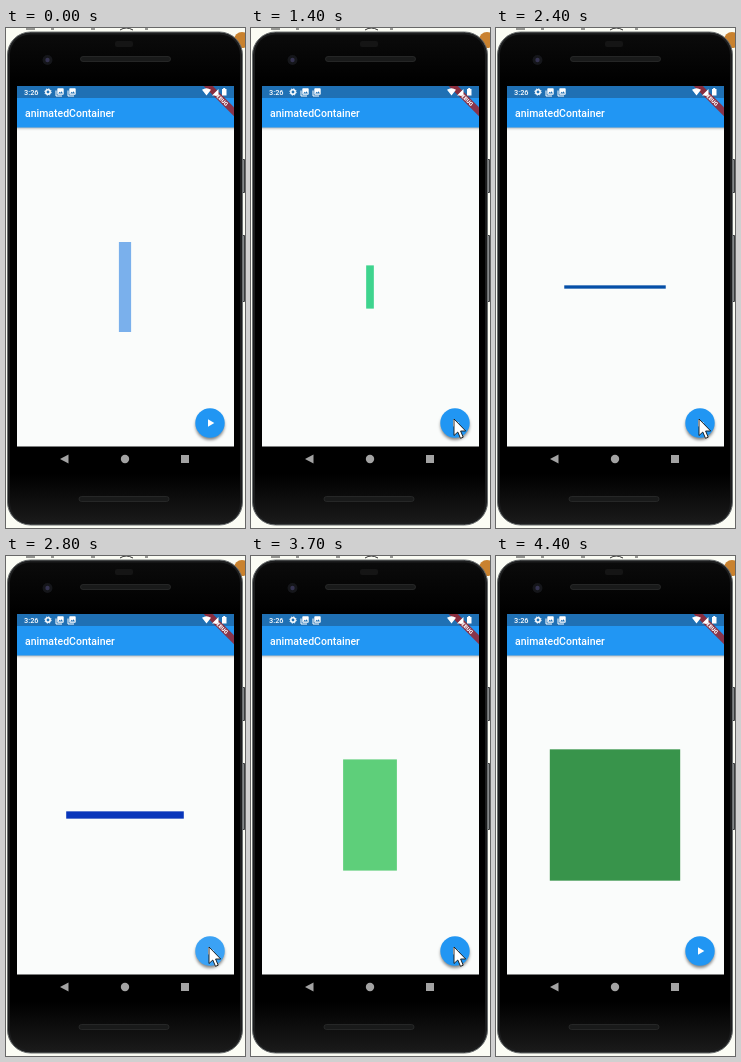
Recreate the animation shown at these times as an HTML page. Size 239 px wide and 500 px high, loop 4.7 s.

```html
<!DOCTYPE html>
<html lang="en">
<head>
<meta charset="utf-8">
<title>animatedContainer</title>
<style>
  html, body { margin: 0; width: 100%; height: 100%; overflow: hidden; background: #fbfcf4; }
  svg { display: block; width: 239px; height: 500px; }
  text { font-family: Roboto, "Open Sans", sans-serif; font-weight: 500; fill: #fff; }
</style>
</head>
<body>
<svg viewBox="0 0 239 500">
  <defs>
    <clipPath id="screen"><rect x="11" y="58" width="217" height="360.500"/></clipPath>
    <filter id="soft" x="-50%" y="-50%" width="200%" height="200%"><feGaussianBlur stdDeviation="1.500"/></filter>
    <linearGradient id="body" x2="0" y2="1">
      <stop offset="0" stop-color="#0b0b0b"/>
      <stop offset=".1" stop-color="#000"/>
      <stop offset=".9" stop-color="#000"/>
      <stop offset="1" stop-color="#1a1a1a"/>
    </linearGradient>
    <g id="photo">
      <path d="M.5 2.500V8H6.500" fill="none" stroke="#fff"/>
      <rect x="1.800" y=".3" width="6.400" height="6.400" rx=".8" fill="#fff"/>
      <path d="M2.800 5.500l1.300-1.800 1 1 1-1.400 1.300 2.200z" fill="#1f70b4"/>
    </g>
  </defs>

  <!-- desktop behind the phone -->
  <path d="M20 1h9M45 1h3M85 1h4M139 1h3M114 2q6-4 13 0" fill="none" stroke="#333"/>
  <circle cx="236" cy="12" r="8" fill="#c9822f"/>
  <path d="M235.500 131.500h3v33h-3zM235.500 207.500h3v66h-3z" fill="#85888a" stroke="#3c3f40"/>

  <!-- phone -->
  <rect x="1.500" y="4" width="235" height="493" rx="23" fill="#1c1d1e" stroke="#6a6e6f"/>
  <rect x="4" y="6.500" width="230" height="488" rx="20" fill="url(#body)"/>
  <rect x="109" y="13" width="18" height="6" rx="2" fill="#151515"/>
  <g fill="#191a1a" stroke="#2b2c2c" stroke-width=".8">
    <rect x="74.500" y="28.500" width="90" height="5" rx="2.500"/>
    <rect x="73" y="468.500" width="90" height="5" rx="2.500"/>
  </g>
  <circle cx="41.500" cy="32" r="5" fill="#15161a"/>
  <circle cx="41.500" cy="32" r="2.200" fill="#34324f"/>
  <g fill="#a3a3a3">
    <path d="M54 431l8.500-4.500v9z"/>
    <circle cx="119" cy="431" r="4.200"/>
    <rect x="175" y="427" width="8" height="8"/>
  </g>

  <!-- app -->
  <g clip-path="url(#screen)">
    <rect x="11" y="58" width="217" height="361" fill="#fafcfb"/>
    <rect x="5" y="71" width="229" height="29" fill="#0006" filter="url(#soft)"/>
    <rect x="11" y="70" width="217" height="29.500" fill="#2196f3"/>
    <rect x="11" y="58" width="217" height="12" fill="#1f70b4"/>
    <text x="19" y="89" font-size="10.5">animatedContainer</text>
    <rect id="box"/>
    <circle cx="204" cy="397.500" r="14.500" fill="#0007" filter="url(#soft)"/>
    <circle cx="204" cy="395" r="14.700" fill="#2196f3"/>
    <circle id="ripple" cx="204" cy="395" r="14.700" fill="#fff"/>
    <path d="M202 391.200v7.600l6.300-3.800z" fill="#fff"/>
    <g transform="translate(228 58) rotate(45)">
      <rect x="-24" y="15" width="48" height="6.400" fill="#a01f25" fill-opacity=".82"/>
      <text y="20.200" font-size="5.4" text-anchor="middle" style="font-weight:900">DEBUG</text>
    </g>
    <text x="18" y="67" font-size="7.4">3:26</text>
    <circle cx="42" cy="64" r="2.200" fill="none" stroke="#fff" stroke-width="1.500"/>
    <circle cx="42" cy="64" r="3.200" fill="none" stroke="#fff" stroke-dasharray="1.250"/>
    <use href="#photo" x="49.500" y="60"/>
    <use href="#photo" x="61.500" y="60"/>
    <path d="M196 61.800q4.500-3 9 0l-4.500 5.700zM206 67.500h6.500v-6.500zM216 61h1.200v-1h2v1h1.300v6.500h-4.500z" fill="#fff"/>
  </g>

  <path id="cursor" d="M0 0V16.500L3.800 13 6.500 19.300 9.200 18.200 6.600 12H11.700Z" fill="#fff" stroke="#111" stroke-width=".9"/>
</svg>
<script>
const LOOP = 4700, LAST = 4400, CX = 119, CY = 259;
const $ = id => document.getElementById(id);
const set = (el, attrs) => { for (const k in attrs) el.setAttribute(k, attrs[k]); };
const mix = (a, b, p) => a.map((v, i) => v + (b[i] - v) * p);

// Box state: width, height, red, green, blue
const first = [12.2, 90, 122, 176, 236];
const taps = [
  { at: 1019, dur: 1050, to: [3.7, 2, 9, 244, 59] },
  { at: 1875, dur: 970, to: [122.5, 3.2, 4, 44, 190] },
  { at: 2700, dur: 830, to: [36, 107, 103, 221, 133] },
  { at: 3462, dur: 1050, to: [131, 131.5, 56, 148, 75] }
];

// Pointer stops: time, x, y
const stops = [
  [200, 228, 349], [300, 210, 372], [400, 197, 392], [500, 222, 402],
  [700, 213, 400], [800, 204, 399], [1000, 203, 391],
  [4200, 214, 320], [4300, 227, 187], [4400, 260, 120]
];

// cubic-bezier(.4, 0, .2, 1)
function ease(p) {
  if (p <= 0) return 0;
  if (p >= 1) return 1;
  let lo = 0, hi = 1, s;
  for (let i = 0; i < 20; i++) {
    s = (lo + hi) / 2;
    const x = 1.2 * s * (1 - s) ** 2 + 0.6 * s * s * (1 - s) + s ** 3;
    if (x < p) lo = s; else hi = s;
  }
  return s * s * (3 - 2 * s);
}

// Each tap starts from wherever the previous change had got to
function boxAt(t) {
  return taps.reduce((now, { at, dur, to }, i) => {
    const end = Math.min(t, taps[i + 1]?.at ?? t);
    return mix(now, to, ease((end - at) / dur));
  }, first);
}

function draw(t) {
  const [w, h, ...rgb] = boxAt(t);
  set($("box"), {
    x: CX - w / 2, y: CY - h / 2, width: w, height: h,
    fill: `rgb(${rgb.map(Math.round)})`
  });

  const tap = taps.findLast(s => s.at <= t);
  set($("ripple"), { opacity: tap ? 0.2 * Math.max(0, 1 - (t - tap.at) / 240) : 0 });

  const [, x, y] = stops.findLast(s => s[0] <= t) ?? [0, 260, 330];
  set($("cursor"), { transform: `translate(${x} ${y})` });
}

// The picture steps ten times a second and rests at the end
function tick() {
  const t = performance.now() % LOOP;
  draw(Math.min(LAST, Math.floor(t / 100) * 100));
  requestAnimationFrame(tick);
}
tick();
</script>
</body>
</html>
```
